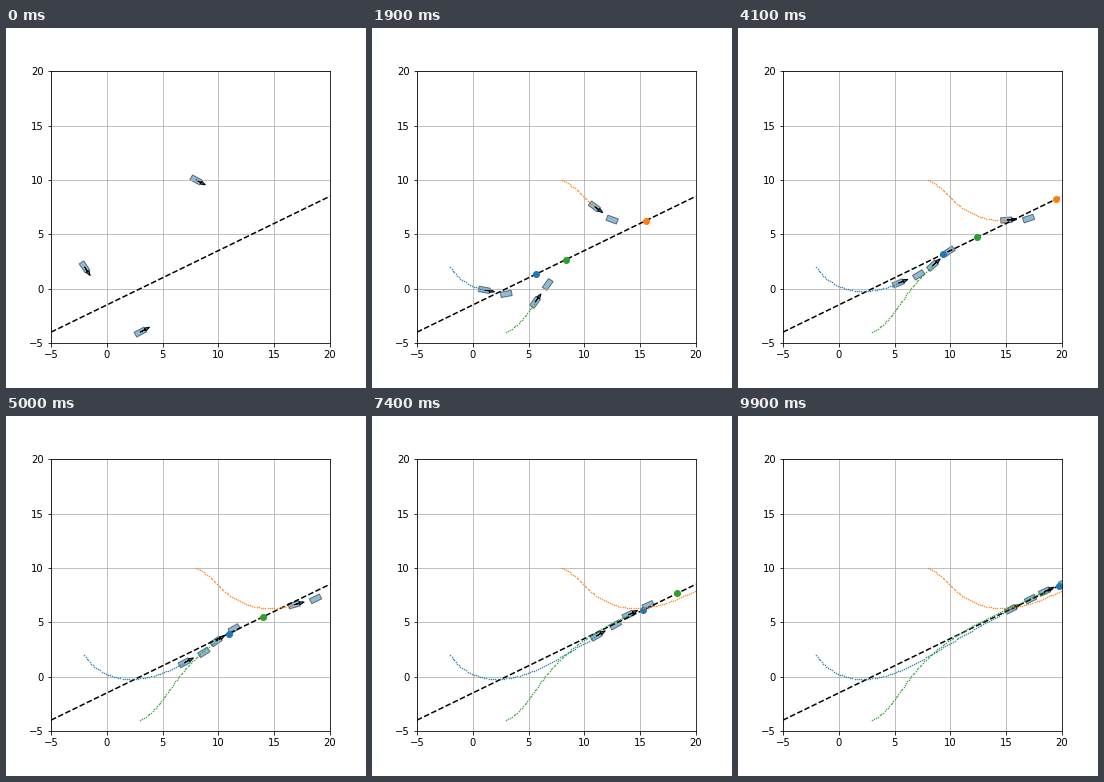
Animation, 360 px wide and 360 px high, one loop 10000 ms. Source, as a matplotlib script:

```python
import numpy as np
import matplotlib.pyplot as plt
from matplotlib.animation import FuncAnimation
from matplotlib.patches import FancyArrow, Rectangle

FRAMES, DT = 100, 0.1
SPEED, BASE, LOOKAHEAD = 2.0, 2.0, 5.0
SLOPE, OFFSET = 0.5, -1.5
WHEEL_W, WHEEL_H = 1.0, 0.5
STARTS = [(-2, 2, -1.0), (8, 10, -0.5), (3, -4, 0.5)]

DIRECTION = np.array([1, SLOPE]) / np.hypot(1, SLOPE)
ORIGIN = np.array([0, OFFSET])


def find_goal(pos):
    """Point of the line one lookahead away, or the nearest one if out of reach."""
    foot = ORIGIN + DIRECTION * np.dot(pos - ORIGIN, DIRECTION)
    reach = LOOKAHEAD**2 - np.sum((pos - foot) ** 2)
    return foot + DIRECTION * np.sqrt(max(reach, 0))


def simulate(x, y, theta):
    """Pure pursuit with a bicycle model; rows of x, y, theta, steer, goal."""
    rows = [(x, y, theta, 0, x, y)]
    for _ in range(FRAMES - 1):
        gx, gy = find_goal(np.array([x, y]))
        alpha = np.arctan2(gy - y, gx - x) - theta
        dist = np.hypot(gx - x, gy - y)
        steer = np.arctan(2 * BASE * np.sin(alpha) / dist)
        x += SPEED * np.cos(theta) * DT
        y += SPEED * np.sin(theta) * DT
        theta += SPEED / BASE * np.tan(steer) * DT
        rows.append((x, y, theta, steer, gx, gy))
    return np.array(rows)


class Vehicle:
    def __init__(self, ax, start, color):
        self.log = simulate(*start)
        self.rear, self.front = (
            ax.add_patch(Rectangle((0, 0), WHEEL_W, WHEEL_H, rotation_point="center",
                                   fc="C0", ec="k", lw=1, alpha=0.5))
            for _ in range(2))
        self.arrow = ax.add_patch(FancyArrow(0, 0, 0.5, 0, width=0.001, head_width=0.3,
                                             head_length=0.45, fc="C0", ec="k", lw=1))
        self.trail, = ax.plot([], [], ".", ms=1, color=color)
        self.goal, = ax.plot([], [], "o", ms=6, color=color)

    def update(self, i):
        x, y, theta, steer, gx, gy = self.log[i]
        c, s = np.cos(theta), np.sin(theta)
        place(self.rear, x, y, theta)
        place(self.front, x + BASE * c, y + BASE * s, theta + steer)
        self.arrow.set_data(x=x, y=y, dx=0.5 * c, dy=0.5 * s)
        self.trail.set_data(self.log[:i + 1, 0], self.log[:i + 1, 1])
        self.goal.set_data([gx], [gy])
        for part in (self.front, self.trail, self.goal):
            part.set_visible(i > 0)
        return [self.rear, self.front, self.arrow, self.trail, self.goal]


def place(wheel, x, y, angle):
    wheel.set_xy((x - WHEEL_W / 2, y - WHEEL_H / 2))
    wheel.set_angle(np.degrees(angle))


plt.rcParams.update({"font.family": "DejaVu Sans", "font.size": 10})
fig = plt.figure(figsize=(5, 5), dpi=72)
ax = fig.add_axes([0.125, 0.125, 0.775, 0.755])
ax.set(xlim=(-5, 20), ylim=(-5, 20), xticks=range(-5, 21, 5), yticks=range(-5, 21, 5))
ax.grid(True)

ends = np.array([-5, 20])
ax.plot(ends, SLOPE * ends + OFFSET, "k--", lw=1.5)
vehicles = [Vehicle(ax, start, f"C{k}") for k, start in enumerate(STARTS)]


def draw(i):
    return [part for v in vehicles for part in v.update(i)]


anim = FuncAnimation(fig, draw, frames=FRAMES, interval=100, repeat=True, repeat_delay=0)
plt.show()
```
